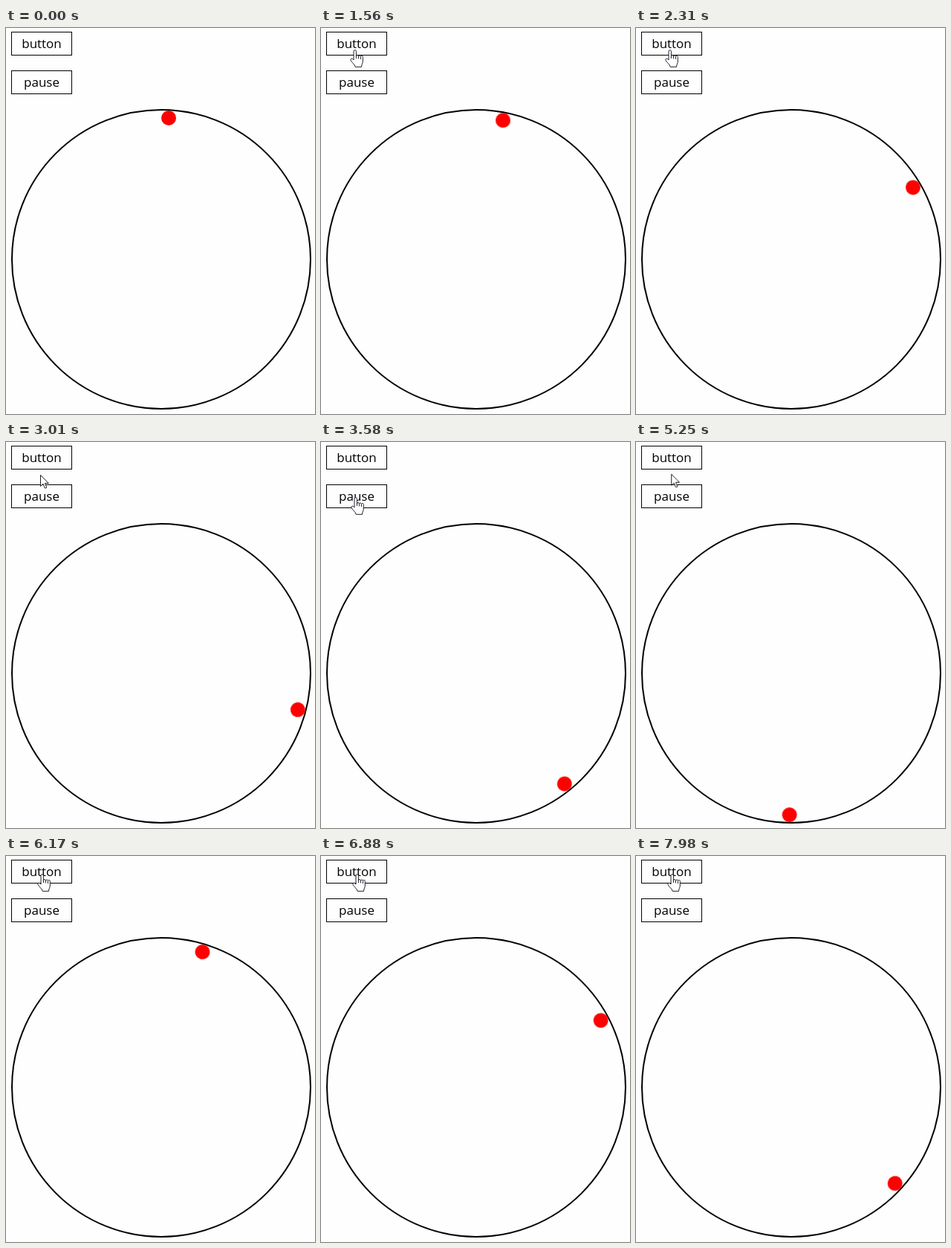
These frames come from a looping animation (416 by 519 pixels, 8000 ms). An HTML page:

```html
<!DOCTYPE html>
<html lang="en">
<head>
<meta charset="utf-8">
<title>Orbit</title>
<style>
html, body { margin: 0; width: 100%; height: 100%; overflow: hidden; background: #fefefe; }
svg { display: block; }
text { font: 17px "Open Sans", "Noto Sans", sans-serif; text-anchor: middle; }
.box { fill: #fefefe; stroke: #000; }
.ring { fill: none; stroke: #000; stroke-width: 2; }
.ball, .cursor, .hand, .arrow { animation: 8s -2ms infinite; }
.ball { fill: #f00; animation-name: orbit; }
.cursor { fill: #fff; stroke: #1c1c28; stroke-linejoin: round; animation-name: move; }
.hand, .arrow { animation-timing-function: step-end; }
.hand { animation-name: hand; }
.arrow { animation-name: arrow; }

/* The ball advances in ticks of about 50 ms */
@keyframes orbit {
  0% { transform: rotate(0deg); animation-timing-function: step-end; }
  18% { transform: rotate(.4deg); animation-timing-function: steps(2); }
  19.5% { transform: rotate(7.9deg); animation-timing-function: steps(12); }
  27.375% { transform: rotate(50deg); animation-timing-function: steps(16); }
  37.625% { transform: rotate(101.9deg); animation-timing-function: steps(16); }
  47.625% { transform: rotate(154.9deg); animation-timing-function: steps(7); }
  52.625% { transform: rotate(177.7deg); animation-timing-function: step-end; }
  74.5% { transform: rotate(.5deg); animation-timing-function: steps(4); }
  77.125% { transform: rotate(13.95deg); animation-timing-function: steps(10); }
  83.875% { transform: rotate(48deg); animation-timing-function: steps(3); }
  86% { transform: rotate(58.8deg); animation-timing-function: steps(11); }
  94.125% { transform: rotate(99.9deg); animation-timing-function: steps(9); }
  99.75%, 100% { transform: rotate(129.75deg); }
}
@keyframes move {
  0% { transform: translate(63px, 0); opacity: 0; animation-timing-function: step-end; }
  6.625% { transform: translate(63px, 0); opacity: 1; animation-timing-function: steps(4); }
  9.6875% { transform: translate(43px, 36px); animation-timing-function: steps(5); }
  12.75% { transform: translate(44px, 30px); animation-timing-function: step-end; }
  15% { transform: translate(45px, 29px); animation-timing-function: step-end; }
  34.375% { transform: translate(45px, 29px); animation-timing-function: steps(5); }
  37.625% { transform: translate(46px, 44px); animation-timing-function: steps(5); }
  41.25% { transform: translate(46px, 74px); animation-timing-function: step-end; }
  61.25% { transform: translate(46px, 74px); animation-timing-function: steps(8); }
  67.875%, 100% { transform: translate(48px, 24px); opacity: 1; }
}
/* The pointer is a hand over a button and an arrow elsewhere */
@keyframes hand {
  0%, 36.325%, 63.734% { opacity: 0; }
  7.39%, 39.8%, 66.219%, 100% { opacity: 1; }
}
@keyframes arrow {
  0%, 36.325%, 63.734% { opacity: 1; }
  7.39%, 39.8%, 66.219%, 100% { opacity: 0; }
}
</style>
</head>
<body>
<svg width="416" height="519" viewBox="0 0 416 519">
  <rect class="box" x="7.5" y="5.5" width="81" height="31"/>
  <text x="48" y="27">button</text>
  <rect class="box" x="7.5" y="57.5" width="81" height="31"/>
  <text x="48" y="79">pause</text>
  <g transform="translate(209 311)">
    <circle class="ring" r="201"/>
    <circle class="ball" cx="10" cy="-190" r="10"/>
  </g>
  <g class="cursor">
    <g class="hand">
      <g transform="translate(-6 0)">
        <path d="M5 14V2.4a1.7 1.7 0 0 1 3.4 0V8.5a1.6 1.6 0 0 1 3 .3a1.6 1.6 0 0 1 3 .7a1.5 1.5 0 0 1 2.9 1V16c0 2.5-1.6 3.5-1.8 7.3H7.2C6.8 20 2.2 17.4 1 14.4C.2 12.5 2.4 11.4 3.7 12.7Z"/>
        <path fill="none" d="M8.4 8v4M11.4 9v3.4M14.4 10v3"/>
      </g>
    </g>
    <path class="arrow" d="M.5 .5V15.6L4 12.3L6.4 18.2L8.8 17.2L6.4 11.5H11.3Z"/>
  </g>
</svg>
</body>
</html>
```
